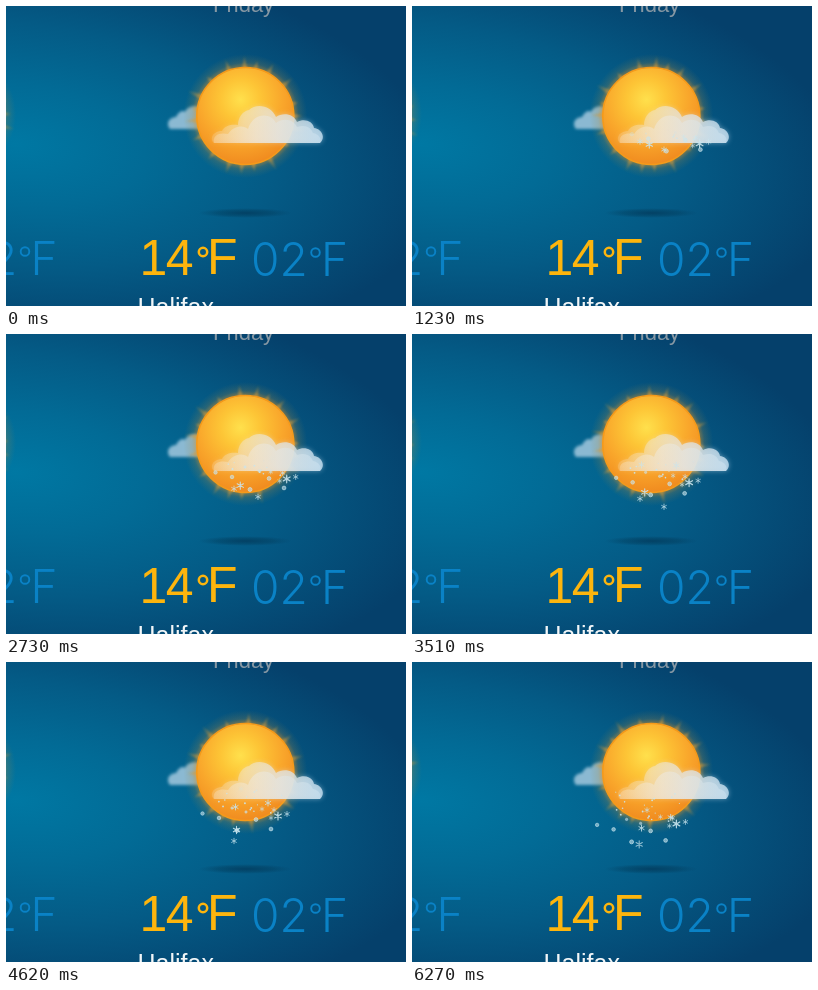
An HTML page that plays this animation: 400 by 300 pixels, repeating every 6300 ms.

```html
<!DOCTYPE html>
<html lang="en">
<head>
<meta charset="utf-8">
<title>Weather</title>
<style>
  html, body { margin: 0; width: 100%; height: 100%; overflow: hidden; background: #05406b; }
  svg { display: block; width: 100vw; height: 100vh; }
  text { font-family: "Liberation Sans", Arial, sans-serif; }
  .low text { font: 300 46px Inter, "Liberation Sans", sans-serif; fill: #0a82c6; }
  .low circle { fill: none; stroke: #0a82c6; stroke-width: 1.9; }
  .high text { font-size: 50px; fill: #fdb50d; }
  .high circle { fill: none; stroke: #fdb50d; stroke-width: 2.5; }
</style>
</head>
<body>
<svg viewBox="0 0 400 300" preserveAspectRatio="none">
  <defs>
    <radialGradient id="sky" gradientUnits="userSpaceOnUse" cx="0" cy="0" r="1"
      gradientTransform="translate(10 138) rotate(6) scale(430 200)">
      <stop offset="0" stop-color="#0078a3"/>
      <stop offset=".3" stop-color="#026b96"/>
      <stop offset=".6" stop-color="#045b86"/>
      <stop offset="1" stop-color="#05406b"/>
    </radialGradient>
    <radialGradient id="disc" cx=".45" cy=".33" r=".68">
      <stop offset="0" stop-color="#ffe04c"/>
      <stop offset=".3" stop-color="#fdc536"/>
      <stop offset=".65" stop-color="#f9a62b"/>
      <stop offset="1" stop-color="#f08a1f"/>
    </radialGradient>
    <radialGradient id="glow">
      <stop offset=".76" stop-color="#e8961f" stop-opacity=".65"/>
      <stop offset=".86" stop-color="#b08a3c" stop-opacity=".22"/>
      <stop offset="1" stop-color="#8a8248" stop-opacity="0"/>
    </radialGradient>
    <radialGradient id="ray" gradientUnits="userSpaceOnUse" cx="0" cy="0" r="64">
      <stop offset=".75" stop-color="#e8a030" stop-opacity=".6"/>
      <stop offset="1" stop-color="#a88b44" stop-opacity=".1"/>
    </radialGradient>
    <linearGradient id="veil">
      <stop offset="0" stop-color="#f6e3c4" stop-opacity=".2"/>
      <stop offset=".3" stop-color="#f1e6d2" stop-opacity=".5"/>
      <stop offset=".6" stop-color="#e3e6e6" stop-opacity=".72"/>
      <stop offset="1" stop-color="#c3def0" stop-opacity=".82"/>
    </linearGradient>
    <linearGradient id="vapour">
      <stop offset="0" stop-color="#f7ead4" stop-opacity=".3"/>
      <stop offset=".4" stop-color="#eee9e0" stop-opacity=".55"/>
      <stop offset="1" stop-color="#cfe4f2" stop-opacity=".5"/>
    </linearGradient>
    <radialGradient id="shade">
      <stop offset="0" stop-color="#022f4e" stop-opacity=".6"/>
      <stop offset=".6" stop-color="#02334f" stop-opacity=".32"/>
      <stop offset="1" stop-color="#023a5c" stop-opacity="0"/>
    </radialGradient>
    <filter id="soft" x="-30%" y="-30%" width="160%" height="160%"><feGaussianBlur stdDeviation="1.7"/></filter>
    <filter id="haze" x="-30%" y="-30%" width="160%" height="160%"><feGaussianBlur stdDeviation="2.8"/></filter>
    <filter id="blur" x="-10%" y="-10%" width="120%" height="120%"><feGaussianBlur stdDeviation=".9"/></filter>
    <path id="cloud" d="M208 137C203 133 207 125 216 125C219 119 226 118 232 119C232 111 237 105 243 104C250 97 265 99 270 111C277 106 288 108 291 116C298 112 307 115 308 122C316 123 320 132 314 137Z"/>
    <g id="sun">
      <circle r="62" fill="url(#glow)"/>
      <g filter="url(#blur)"><g id="rays" fill="url(#ray)"/></g>
      <circle r="48.5" fill="url(#disc)" stroke="#f59a1a" stroke-width="1.6"/>
    </g>
    <path id="star" d="M0-3V3M-2.6-1.5L2.6 1.5M-2.6 1.5L2.6-1.5" stroke-width=".9" stroke-linecap="round"/>
  </defs>

  <rect width="400" height="300" fill="url(#sky)"/>
  <ellipse cx="239" cy="207" rx="47" ry="5" fill="url(#shade)"/>

  <use href="#sun" x="-52" y="108"/>
  <path filter="url(#soft)" fill="#b9d6e8" fill-opacity=".75" d="M164 123C159 117 164 111 170 111C173 105 177 104 179 106C181 100 190 98 198 103V123Z"/>
  <use href="#sun" x="239.300" y="110"/>

  <use href="#cloud" fill="url(#veil)" opacity=".6" filter="url(#haze)"/>
  <use href="#cloud" fill="url(#veil)"/>
  <path fill="url(#vapour)" d="M208 137C206 129 214 126 222 128C228 119 238 119 242 123C247 106 265 106 270 117C278 111 288 114 291 121C300 118 305 122 307 127C313 128 316 133 314 137Z"/>

  <g id="snow" fill="#c9e5ee" stroke="#c9e5ee"></g>

  <text x="207" y="6" font-size="22" fill="#8798a4">Friday</text>
  <text x="131.500" y="310" font-size="25" fill="#f2f6f8">Halifax</text>

  <g class="high">
    <text x="133.500" y="269" letter-spacing="-1.500">14</text>
    <circle cx="197" cy="246" r="4.200"/>
    <text x="201" y="268.300">F</text>
  </g>
  <g id="low" class="low">
    <text x="245" y="270">02</text>
    <circle cx="309.500" cy="246.500" r="4.300"/>
    <text x="315" y="270">F</text>
  </g>
  <use href="#low" x="-290.500" y="-1"/>
</svg>

<script>
const LOOP = 6.3, ANCHOR = 4.62;
const NS = "http://www.w3.org/2000/svg";
const rays = document.getElementById("rays");
const snow = document.getElementById("snow");
const clamp = v => Math.max(0, Math.min(1, v));

function add(parent, tag, attrs) {
  const el = document.createElementNS(NS, tag);
  for (const key in attrs) el.setAttribute(key, attrs[key]);
  return parent.appendChild(el);
}

let seed = 17;
function random() {
  seed = (seed * 16807) % 2147483647;
  return seed / 2147483647;
}

for (let i = 0; i < 19; i++) {
  const reach = 57 + 3.5 * Math.sin(i * 2.4) + 3 * (i % 2);
  add(rays, "path", {
    d: `M45-3L${reach.toFixed(1)} 0L45 3Z`,
    transform: `rotate(${i * 360 / 19 + 5 * Math.sin(i * 5)})`
  });
}

const dot = () => add(snow, "circle", { r: 1.7, "fill-opacity": .65, "stroke-width": .7 });
const star = () => add(snow, "use", { href: "#star" });
const speck = () => add(snow, "circle", { r: .8, stroke: "none" });

// Each layer shares one velocity; points give x and y at ANCHOR, then size.
const layers = [
  { make: dot, drift: -6.9, fall: 6.9, points: [
    [196.5, 151.5, 1], [213, 156, 1.05], [231, 168.5, 1.15], [250, 157.5, 1.1],
    [265, 167, 1.1], [226, 146, .7], [240, 150, .7]] },
  { make: star, drift: -4.6, fall: 4.8, points: [
    [272, 154, 1.3], [281, 152, .85], [268, 148, .8], [265, 156, .7], [256, 147, .7]] },
  { make: star, drift: 0, fall: 12.8, points: [
    [252, 187, .9], [228, 179, .9], [229.5, 145, 1], [235, 127, .8]] },
  { make: star, drift: -2, fall: 8.7, points: [[230.5, 168, 1.2], [262, 141, 1]] },
  { make: speck, drift: -5, fall: 5, points: Array.from({ length: 20 }, (_, i) =>
    [212 + random() * 70, 122 + i * 1.6, .7 + random() * .5]) }
];

const flakes = layers.flatMap(({ make, drift, fall, points }) =>
  points.map(([x, y, size]) => ({ el: make(), x, y, size, drift, fall })));

function render(t) {
  rays.setAttribute("transform", `rotate(${(t * 5).toFixed(2)})`);
  const dt = t - ANCHOR;
  const onset = clamp((t - .3) / .7);
  for (const f of flakes) {
    const x = f.x + f.drift * dt, y = f.y + f.fall * dt;
    const shown = onset * clamp((y - 124) / 9) * clamp((187 - y) / 6);
    f.el.setAttribute("transform", `translate(${x.toFixed(2)} ${y.toFixed(2)}) scale(${f.size})`);
    f.el.setAttribute("opacity", (shown * .9).toFixed(3));
  }
}

const start = performance.now();
function tick() {
  render(((performance.now() - start) / 1000) % LOOP);
  requestAnimationFrame(tick);
}
render(0);
requestAnimationFrame(tick);
</script>
</body>
</html>
```
